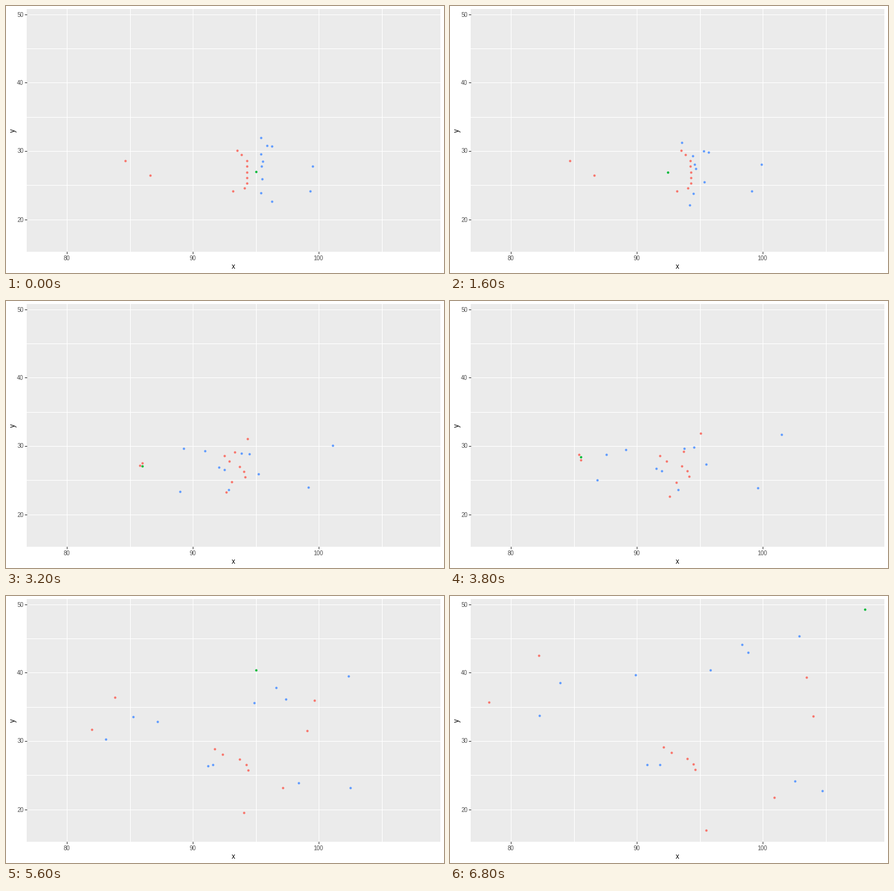
Recreate the animation shown at these times as a matplotlib script. Size 720 by 440 pixels, loop 6900 ms.

```python
import numpy as np
import matplotlib.pyplot as plt
from matplotlib.animation import FuncAnimation
from matplotlib.patches import Rectangle

W, H, DPI = 720, 440, 80
FRAMES, STEP = 69, 100
PT = 72 / DPI  # points per pixel
RED, GREEN, BLUE = "#F8766D", "#00BA38", "#619CFF"
SNAP, CREEP, THROW = 14, 5, 49


def route(start, *points):
    """Stand until start, then run smoothly through evenly timed points."""
    p = np.array(points, float)
    t = np.linspace(start, FRAMES - 1, len(p))
    h = t[1] - t[0]
    m = np.gradient(p, axis=0)
    m[0] = 0

    def at(s):
        s = max(s, start)
        k = min(int((s - start) / h), len(p) - 2)
        u = (s - t[k]) / h
        ease = u * u * (3 - 2 * u)
        return (p[k] + (p[k + 1] - p[k]) * ease
                + u * (1 - u) * ((1 - u) * m[k] - u * m[k + 1]))

    return at


def blocker(i):
    """Lineman i, counted from the top; the upper side gives more ground."""
    x, y = 397, 256 + 9.3 * i
    held = x - 55 / (1 + (i / 1.5) ** 3)
    return route(SNAP, (x, y), (held, y - i), (held + 10, y - 6))


passer = route(SNAP, (238, 280), (221, 272), (194, 200), (147, 99))
offense = [passer] + [blocker(i) for i in range(5)] + [
    route(SNAP, (197, 256), (225, 268), (174, 240), (65, 176)),
    route(SNAP, (381, 239), (424, 214), (587, 135)),
    route(SNAP, (388, 246), (394, 247), (598, 199)),
    route(SNAP, (393, 301), (379, 301), (534, 333)),
    route(SNAP, (374, 306), (364, 327), (422, 387)),
]
defense = [
    route(CREEP, (420, 218), (325, 236), (229, 250), (306, 131)),
    route(CREEP, (420, 245), (360, 249), (239, 233), (182, 144)),
    route(CREEP, (438, 323), (327, 328), (189, 265), (148, 198)),
    route(CREEP, (423, 257), (342, 277), (346, 279)),
    route(CREEP, (421, 265), (351, 281), (325, 279)),
    route(CREEP, (422, 286), (420, 275), (491, 94)),
    route(CREEP, (420, 309), (372, 312), (568, 306)),
    route(CREEP, (430, 231), (386, 247), (429, 123)),
    route(CREEP, (438, 232), (401, 246), (481, 81)),
    route(CREEP, (505, 265), (544, 226), (575, 67)),
    route(CREEP, (501, 306), (504, 309), (613, 322)),
]


def track(s, times, xs, ys):
    return np.array([np.interp(s, times, xs), np.interp(s, times, ys)])


def ball(s):
    if s < 25:
        return track(s, [12, 25], [412, 240], [274, 277])
    if s < THROW:
        return passer(s) + track(s, [25, THROW], [5, 0], [-3, 10])
    return track(s, [THROW, 56, 63, 68], [222, 412, 608, 683], [174, 123, 53, 23])


fig = plt.figure(figsize=(W / DPI, H / DPI), dpi=DPI, facecolor="white")
ax = fig.add_axes([0, 0, 1, 1])
ax.set(xlim=(0, W), ylim=(H, 0))
ax.axis("off")

L, T, R, B = 34, 5, 714, 405
ax.add_patch(Rectangle((L, T), R - L, B - T, fc="#EBEBEB", lw=0, zorder=0))


def px_x(v):
    return round(99.4 + (v - 80) * 20.7) + 0.5


def px_y(v):
    return round(12.6 + (50 - v) * 11.27) + 0.5


def stroke(xs, ys, color):
    ax.plot(xs, ys, color=color, lw=PT, aa=False, solid_capstyle="butt", zorder=1)


def label(x, y, s, size, color, **kw):
    ax.text(x, y, s, fontsize=size * PT, color=color, family="Liberation Sans", **kw)


for v in range(80, 106, 5):
    stroke([px_x(v)] * 2, [T, B], "white")
for v in range(20, 51, 5):
    stroke([L, R], [px_y(v)] * 2, "white")
for v in (80, 90, 100):
    stroke([px_x(v)] * 2, [B, B + 3], "#333333")
    label(px_x(v), 419, v, 9.6, "#4D4D4D", ha="center", va="baseline")
for v in (20, 30, 40, 50):
    stroke([L - 3, L], [px_y(v)] * 2, "#333333")
    label(29, px_y(v) + 4, v, 9.6, "#4D4D4D", ha="right", va="baseline")
label(374, 433, "x", 11.5, "black", ha="center", va="baseline")
label(12, 205, "y", 11.5, "black", ha="center", va="center", rotation=90)

movers = offense + defense + [ball]
colors = [RED] * len(offense) + [BLUE] * len(defense) + [GREEN]


def spots(i):
    return np.round([at(i) for at in movers]) - 0.5


dots = ax.scatter(*spots(0).T, s=(3.9 * PT) ** 2, c=colors, lw=0, zorder=3)


def draw(i):
    dots.set_offsets(spots(i))
    return [dots]


anim = FuncAnimation(fig, draw, frames=FRAMES, interval=STEP, repeat=True,
                     repeat_delay=0, blit=False)
plt.show()
```
